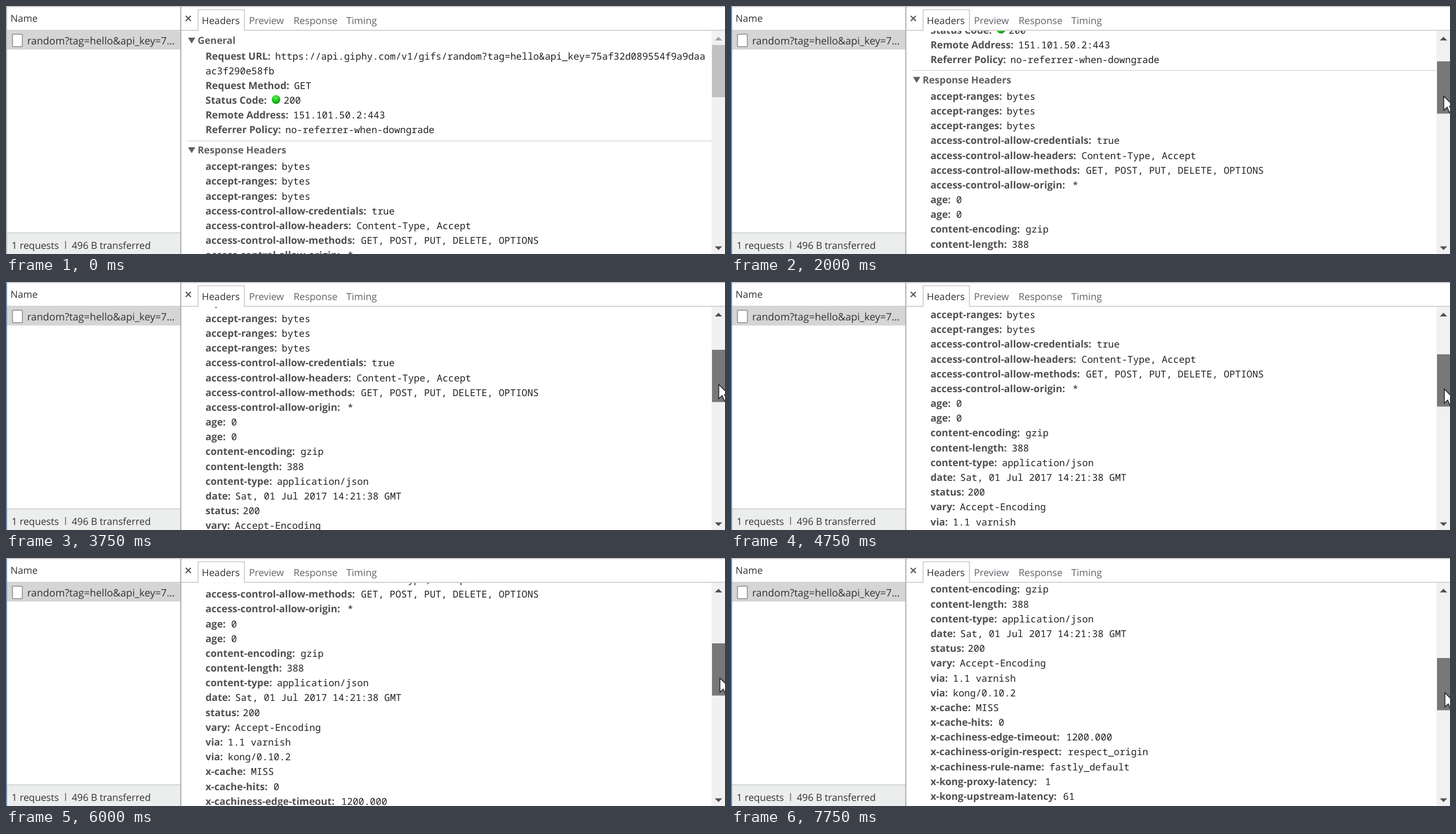
Write an HTML page that moves like this. It is 1274 px wide and 439 px high and loops after 8 s.

```html
<!DOCTYPE html>
<html lang="en">
<head>
<meta charset="utf-8">
<title>Request headers</title>
<style>
  html, body { margin: 0; width: 100%; height: 100%; overflow: hidden; background: #fff; }
  #stage { display: block; width: 1274px; height: 439px; }
  text { font: 17.2px "Open Sans", "Noto Sans", sans-serif; fill: #333; white-space: pre; text-rendering: geometricPrecision; }
  .tab { fill: #5f6368; }
  .section { font-weight: 700; fill: #606060; }
  .key { font-size: 17.5px; font-weight: 700; fill: #505050; }
  .value { font: 16.95px "Noto Sans Mono", "DejaVu Sans Mono", monospace; fill: #222; }
  .line { stroke: #c8c8c8; stroke-width: 1.6; fill: none; }
  .mark { fill: #606060; }
</style>
</head>
<body>
<svg id="stage" viewBox="0 0 1274 439">
  <defs>
    <radialGradient id="green" cx=".45" cy=".3" r=".7">
      <stop offset="0" stop-color="#5df04f"/>
      <stop offset=".6" stop-color="#1fc51f"/>
      <stop offset="1" stop-color="#0a930f"/>
    </radialGradient>
  </defs>
  <rect width="1274" height="439" fill="#fff"/>

  <!-- request list -->
  <rect x="2" y="44" width="307" height="33" fill="#d5d5d5"/>
  <rect x="2" y="402" width="307" height="37" fill="#eceeed"/>
  <path class="line" d="M2 43H309M2 401.500H309"/>
  <rect x="11.500" y="50" width="17.500" height="22" rx="1" fill="#fff" stroke="#8c8c8c" stroke-width="1.500"/>
  <text x="8" y="28">Name</text>
  <text x="37.500" y="67.500" style="font-size:18px">random?tag=hello&amp;api_key=7…</text>
  <text x="10" y="430">1 requests</text>
  <path d="M105.500 416V430" stroke="#555" stroke-width="1.300"/>
  <text x="116.500" y="430">496 B transferred</text>

  <!-- scrolled details -->
  <svg x="312" y="44" width="938" height="395" viewBox="312 44 938 395">
    <g id="content">
      <path class="mark" d="M322.500 56H335.500L329 66.500Z"/>
      <text class="section" x="339.500" y="67">General</text>
      <circle cx="478.500" cy="165.500" r="7.700" fill="url(#green)"/>
      <path class="line" style="stroke:#dadada" d="M322 238.700H1250"/>
      <path class="mark" d="M322.500 250H335.500L329 260.500Z"/>
      <text class="section" x="339.500" y="261">Response Headers</text>
    </g>
  </svg>

  <!-- tabs -->
  <path class="line" d="M311 43H340.500V6.500H422.500V43H1274"/>
  <path d="M318.500 17.500L327.500 26.500M327.500 17.500L318.500 26.500" stroke="#555" stroke-width="2"/>
  <text x="347" y="31.500">Headers</text>
  <text class="tab" x="430.500" y="31.500">Preview</text>
  <text class="tab" x="509.500" y="31.500">Response</text>
  <text class="tab" x="603" y="31.500">Timing</text>

  <!-- frame lines -->
  <path class="line" style="stroke:#b8b8b8" d="M0 1H1274"/>
  <path d="M309.700 1V439" stroke="#a6a6a6" stroke-width="1.800"/>
  <path id="edge" d="M1 1V439" stroke-width="1.800"/>

  <!-- scrollbar -->
  <rect x="1250" y="44" width="24" height="395" fill="#f1f1f1"/>
  <path id="up" d="M1256 61L1262.500 54.500L1269 61Z"/>
  <path d="M1256 425.500H1269L1262.500 432Z" fill="#505050"/>
  <rect id="thumb" x="1251" width="23" height="92.500"/>
  <path id="cursor" d="M0 0V25L6 19.500L10 29L14 27L10 18H18Z" fill="#fff" stroke="#111" stroke-width="1.300"/>
</svg>
<script>
const LOOP = 8000, TOP = 69, SCROLL_RATIO = 4.3;
const PRESS = 1250;
const byId = id => document.getElementById(id);
const content = byId('content'), thumb = byId('thumb'), cursor = byId('cursor');

function addText(className, x, y, string) {
  const node = document.createElementNS('http://www.w3.org/2000/svg', 'text');
  node.setAttribute('class', className);
  node.setAttribute('x', x);
  node.setAttribute('y', y);
  node.textContent = string;
  content.append(node);
}

// Each row: key, left edge of the value, value
function addRows(rows, y, pitch) {
  rows.forEach(([key, x, value], i) => {
    if (key) addText('key', 353.5, y + i * pitch, key + ':');
    addText('value', x, y + i * pitch, value);
  });
}

addRows([
  ['Request URL', 477, 'https://api.giphy.com/v1/gifs/random?tag=hello&api_key=75af32d089554f9a9daa'],
  ['', 353.5, 'ac3f290e58fb'],
  ['Request Method', 510.5, 'GET'],
  ['Status Code', 492, '200'],
  ['Remote Address', 509, '151.101.50.2:443'],
  ['Referrer Policy', 495, 'no-referrer-when-downgrade']
], 95.3, 26);

addRows([
  ['accept-ranges', 488.5, 'bytes'],
  ['accept-ranges', 488.5, 'bytes'],
  ['accept-ranges', 488.5, 'bytes'],
  ['access-control-allow-credentials', 648, 'true'],
  ['access-control-allow-headers', 621, 'Content-Type, Accept'],
  ['access-control-allow-methods', 629, 'GET, POST, PUT, DELETE, OPTIONS'],
  ['access-control-allow-origin', 605, '*'],
  ['age', 399, '0'],
  ['age', 399, '0'],
  ['content-encoding', 522, 'gzip'],
  ['content-length', 497.5, '388'],
  ['content-type', 480, 'application/json'],
  ['date', 406, 'Sat, 01 Jul 2017 14:21:38 GMT'],
  ['status', 419.5, '200'],
  ['vary', 405.5, 'Accept-Encoding'],
  ['via', 393, '1.1 varnish'],
  ['via', 393, 'kong/0.10.2'],
  ['x-cache', 434, 'MISS'],
  ['x-cache-hits', 474, '0'],
  ['x-cachiness-edge-timeout', 594, '1200.000'],
  ['x-cachiness-origin-respect', 597, 'respect_origin'],
  ['x-cachiness-rule-name', 564, 'fastly_default'],
  ['x-kong-proxy-latency', 556.5, '1'],
  ['x-kong-upstream-latency', 588.5, '61']
], 290.3, 26.18);

// Start of each drag and the thumb position after every quarter second of it
const drags = [
  [1250, [73, 81, 90, 98, 101]],
  [2750, [105, 109, 113, 116.5, 120, 122.5]],
  [4500, [125, 127.7, 131]],
  [5500, [137, 144, 150.6, 154, 157]],
  [6750, [161, 164.8]],
  [7500, [171, 177]]
];
const approach = [[1268, 139], [1265, 135], [1263, 130]];

function thumbAt(time) {
  const drag = drags.filter(([start]) => start <= time).pop();
  if (!drag) return TOP;
  const [start, tops] = drag;
  return tops[Math.min(Math.floor((time - start) / 250), tops.length - 1)];
}

function cursorAt(time, top) {
  if (time < 250) return [1300, 139];
  if (time < PRESS) return approach[Math.min(Math.floor(time / 250) - 1, 2)];
  return [1263 + (top > 120) + (top > 140), Math.round(top) + 61.5];
}

function draw(time) {
  const top = thumbAt(time), pressed = time >= PRESS;
  const scroll = Math.round((top - TOP) * SCROLL_RATIO * 2) / 2;
  content.setAttribute('transform', `translate(0 ${-scroll})`);
  thumb.setAttribute('y', Math.round(top));
  thumb.setAttribute('fill', pressed ? '#787878' : time >= 250 ? '#a8a8a8' : '#c1c1c1');
  byId('up').setAttribute('fill', pressed ? '#505050' : '#a3a3a3');
  byId('edge').setAttribute('stroke', pressed ? '#4a8fc7' : '#b0b0b0');
  cursor.setAttribute('transform', `translate(${cursorAt(time, top)})`);
}

const begin = performance.now();
function tick() {
  draw((performance.now() - begin) % LOOP);
  requestAnimationFrame(tick);
}
tick();
</script>
</body>
</html>
```
